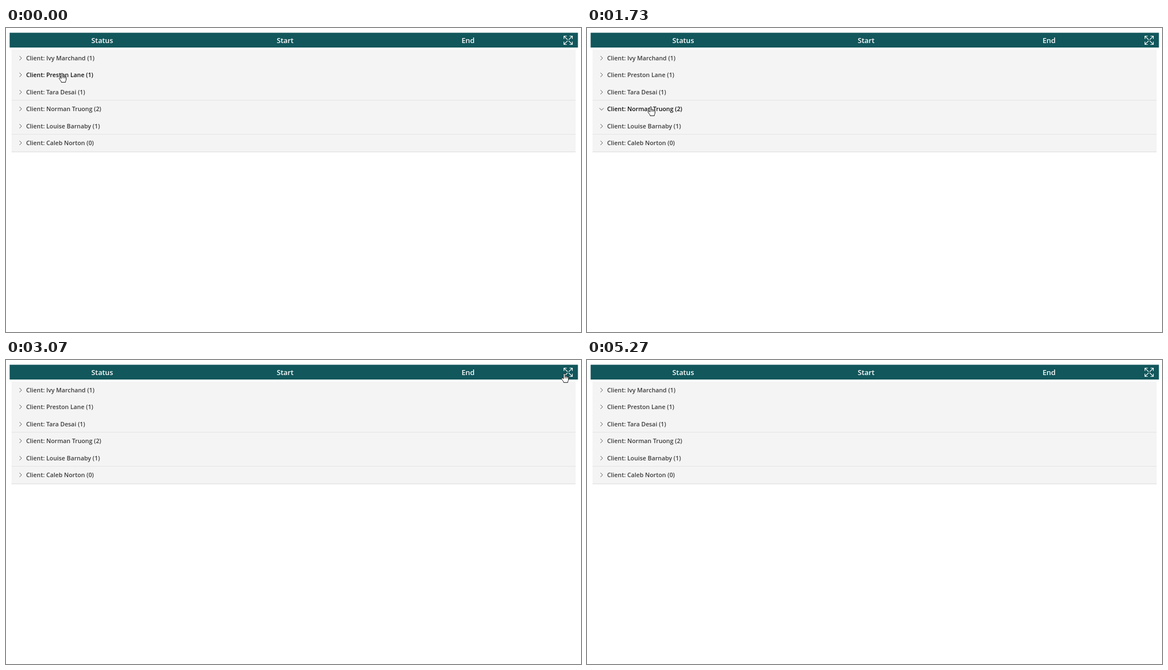
Recreate the animation shown at these times as an HTML page with a canvas. Size 1028 px wide and 545 px high, loop 5.74 s.

```html
<!DOCTYPE html>
<html lang="en">
<head>
<meta charset="utf-8">
<title>Grouped bookings</title>
<style>
html, body { margin: 0; width: 100%; height: 100%; overflow: hidden; background: #fff; }
canvas { display: block; }
</style>
</head>
<body>
<canvas id="stage" width="1028" height="545"></canvas>
<script>
const ctx = document.getElementById('stage').getContext('2d');
const LOOP = 5740, TICK = 200 / 3;
const FONT = '"Open Sans", "Noto Sans", sans-serif';

const clients = [
  { name: 'Ivy Marchand', visits: [['Cancelled', '8/18/2024']] },
  { name: 'Preston Lane', visits: [['Cancelled', '8/20/2024']] },
  { name: 'Tara Desai', visits: [['Booked', '11/13/2024']] },
  { name: 'Norman Truong', visits: [['Booked', '8/18/2024'], ['Booked', '11/13/2024']] },
  { name: 'Louise Barnaby', visits: [['Booked', '11/14/2024']] },
  { name: 'Caleb Norton', visits: [] }
];

// Pointer keys: time, x, y of the hot spot
const pointerKeys = [
  [0, 100, 81], [1200, 100, 81], [1530, 114, 141], [1800, 114, 141],
  [2200, 139, 149], [2330, 139, 149], [2400, 150, 146], [2470, 215, 130],
  [2670, 650, 52], [2870, 965, 9], [3000, 996, 22], [3070, 998, 24],
  [3330, 1001, 23], [4600, 1001, 23], [4740, 960, 44], [4940, 560, 235],
  [5200, 71, 535]
];

const within = (t, a, b) => t >= a && t < b;

function pointerAt(t) {
  const i = pointerKeys.findIndex(k => k[0] >= t);
  if (i < 0) return null;
  if (i === 0) return pointerKeys[0].slice(1);
  const [t0, x0, y0] = pointerKeys[i - 1], [t1, x1, y1] = pointerKeys[i];
  const p = (t - t0) / (t1 - t0);
  return [x0 + (x1 - x0) * p, y0 + (y1 - y0) * p];
}

function rowState(i, t) {
  const all = within(t, 3730, 4670);
  if (i === 1) return {
    down: within(t, 330, 1070), open: all || within(t, 400, 1200),
    filled: all || within(t, 470, 1200), dark: t < 1270
  };
  if (i === 3) return {
    down: within(t, 1730, 2330), open: all || within(t, 1870, 2470),
    filled: all || within(t, 1930, 2470), dark: within(t, 1730, 2470)
  };
  return { down: false, open: all, filled: all, dark: false };
}

function write(str, x, y, size, weight, color, align = 'center') {
  ctx.font = `${weight} ${size}px ${FONT}`;
  ctx.fillStyle = color;
  ctx.textAlign = align;
  ctx.fillText(str, x, y);
}

function strokeLine(points, color, width) {
  ctx.beginPath();
  points.forEach(([x, y]) => ctx.lineTo(x, y));
  ctx.strokeStyle = color;
  ctx.lineWidth = width;
  ctx.stroke();
}

function chevron(x, y, w, h, down) {
  const pts = down ? [[-h, -w], [0, w], [h, -w]] : [[-w, -h], [w, 0], [-w, h]];
  strokeLine(pts.map(([dx, dy]) => [x + dx, y + dy]), '#333', .8);
}

function expandIcon(color) {
  for (const sx of [-1, 1]) for (const sy of [-1, 1]) {
    const at = (x, y) => [1005 + sx * x, 22 + sy * y];
    strokeLine([at(.9, .9), at(7.5, 7.5)], color, 1.2);
    strokeLine([at(2.5, 7.5), at(7.5, 7.5), at(7.5, 2.5)], color, 1.2);
  }
}

function drawHeader(t) {
  ctx.fillStyle = '#11575c';
  ctx.fillRect(6.5, 8.5, 1016, 26.5);
  write('Status', 172, 26.5, 12.8, 600, '#fff');
  write('Start', 499, 26.5, 12.8, 600, '#fff');
  write('End', 826, 26.5, 12.8, 600, '#fff');
  const pressed = within(t, 3600, 3730) || within(t, 4530, 4670);
  expandIcon(pressed ? '#d5e2e3' : '#fff');
}

function drawVisit([status, date], y) {
  const base = Math.round(y + 3.7);
  write(status, 176.5, base, 10.1, 400, '#262626');
  write(date, 497.5, base, 10.1, 400, '#262626');
  write(date, 818.3, base, 10.1, 400, '#262626');
  chevron(996, Math.round(y) - .5, 2.5, 4.5);
}

function drawRows(t) {
  let cy = 54.05;
  clients.forEach(({ name, visits }, i) => {
    const s = rowState(i, t), n = visits.length;
    const open = s.open && n > 0;
    const strong = open || i === clients.length - 1;
    const mid = Math.round(cy), top = Math.round(cy - 15.4);
    const edge = Math.round(cy + 14.6) + (strong ? .4 : 0);
    ctx.fillStyle = '#f4f4f4';
    ctx.fillRect(9.8, top, 1008.6, edge - top);
    ctx.fillStyle = strong ? '#dcdcdc' : '#e4e4e4';
    ctx.fillRect(9.8, edge, 1008.6, strong ? 1.2 : 1);
    chevron(26, mid + (s.down ? .5 : 0), 1.9, 3.7, s.down);
    write(`Client: ${name} (${n})`, 36, mid + 4, 10.8, 600, s.dark ? '#111' : '#3c3c3c', 'left');
    if (s.filled) visits.forEach((v, k) => drawVisit(v, cy + 34.6 + 34.2 * k));
    cy += 30.42 + (open ? 41.8 + 30.6 * (n - 1) : 0);
  });
}

const hand = new Path2D('M-1.3 9.5V1.5a1.3 1.3 0 0 1 2.6 0V6a1.1 1.1 0 0 1 2.2 .3' +
  'a1.1 1.1 0 0 1 2.1 .5a1 1 0 0 1 2 .8V11c0 2-1.2 2.8-1.3 5.3H-1' +
  'C-1.2 14.2-3.2 12.8-4.8 9.8C-5.4 8.5-4 7.4-2.8 8.4Z');
const fingers = new Path2D('M1.3 6V9M3.5 6.5V9M5.6 7V9.2');
const arrow = new Path2D('M.5 .8V14L3.6 11.2L5.8 16L7.8 15L5.7 10.5H9.8Z');

function drawPointer(t) {
  const pos = pointerAt(t);
  if (!pos) return;
  const [x, y] = pos.map(Math.round);
  const overRow = y > 39 && y < 222;
  const overIcon = x > 994 && y > 14 && y < 32;
  const isHand = overRow || overIcon;
  ctx.save();
  ctx.translate(x, y);
  ctx.fillStyle = '#fff';
  ctx.strokeStyle = '#111';
  ctx.lineWidth = 1;
  ctx.lineJoin = 'round';
  ctx.fill(isHand ? hand : arrow);
  ctx.stroke(isHand ? hand : arrow);
  if (isHand) {
    ctx.lineWidth = .8;
    ctx.stroke(fingers);
  }
  ctx.restore();
}

function draw(now) {
  // The picture advances in steps of a fifteenth of a second
  const step = Math.floor((now % LOOP) / TICK + .1) * TICK;
  const t = step + 4;
  ctx.fillStyle = '#fff';
  ctx.fillRect(0, 0, 1028, 545);
  drawHeader(t);
  drawRows(t);
  drawPointer(step);
  requestAnimationFrame(() => draw(performance.now() - start));
}

const start = performance.now();
draw(0);
</script>
</body>
</html>
```
